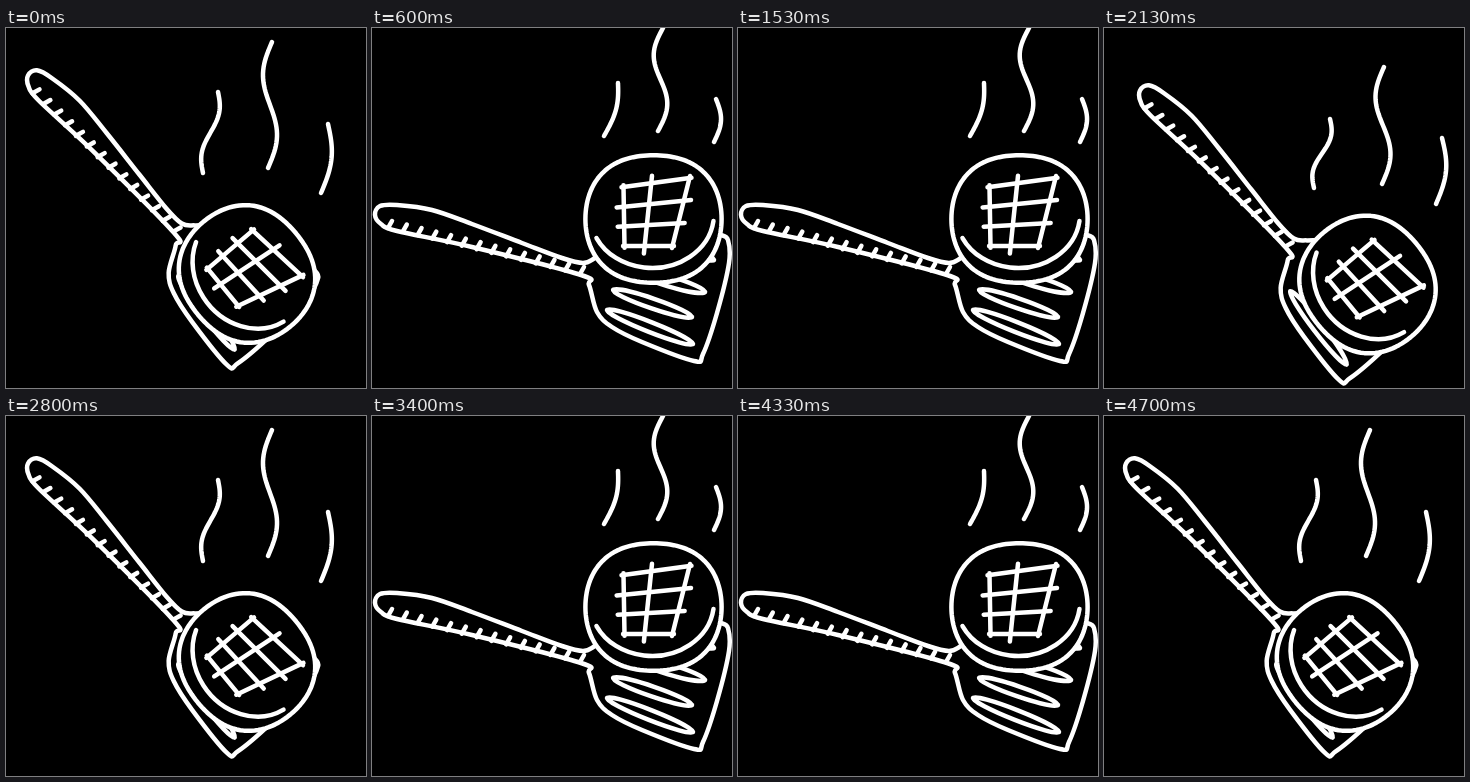
Write an HTML page with a canvas that moves like this. It is 360 px wide and 360 px high and loops after 5000 ms.

```html
<!DOCTYPE html>
<html lang="en">
<head>
<meta charset="utf-8">
<title>Flipping a patty</title>
<style>
html, body { margin: 0; width: 100%; height: 100%; overflow: hidden; background: #000; }
canvas { display: block; width: 360px; height: 360px; }
</style>
</head>
<body>
<canvas id="stage" width="360" height="360"></canvas>
<script>
const ctx = document.getElementById('stage').getContext('2d');
const { PI, sin, cos, hypot, atan2 } = Math;
const degrees = PI / 180;

const mix = (a, b, t) => a + (b - a) * t;
const between = (p, q, t) => [mix(p[0], q[0], t), mix(p[1], q[1], t)];

function polyline(points) {
  ctx.beginPath();
  points.forEach(p => ctx.lineTo(...p));
  ctx.stroke();
}

// Smooth curve through key points.
function curve(points) {
  const at = i => points[Math.max(0, Math.min(points.length - 1, i))];
  ctx.beginPath();
  ctx.moveTo(...points[0]);
  for (let i = 0; i < points.length - 1; i++) {
    const [a, b, c, d] = [at(i - 1), at(i), at(i + 1), at(i + 2)];
    ctx.bezierCurveTo(b[0] + (c[0] - a[0]) / 6, b[1] + (c[1] - a[1]) / 6,
      c[0] - (d[0] - b[0]) / 6, c[1] - (d[1] - b[1]) / 6, ...c);
  }
  ctx.stroke();
}

function placed({ x, y, turn }, paint) {
  ctx.save();
  ctx.translate(x, y);
  ctx.rotate(turn * degrees);
  paint();
  ctx.restore();
}

// Spatula, measured from the end of its handle.
const outline = [
  [236, 32], [220, 43], [208, 48], [187, 43], [147, 28], [97, 9], [57, -5], [22, -10], [5, -9],
  [0, 0], [6, 9], [22, 16], [97, 32], [206, 60], [214, 70], [222, 97], [237, 112],
  [267, 127], [319, 146], [328, 139], [342, 98], [354, 48], [353, 25], [346, 20]
];
const slots = [
  [[232, 95], [318, 129]], [[238, 75], [317, 102]],
  [[259, 56], [330, 77]], [[267, 13], [339, 45]]
];

function spatula() {
  curve(outline);
  for (let i = 0; i < 14; i++) {
    const [x, y] = between([13, 13], [205, 59], i / 13);
    polyline([[x, y], [x + 4, y - 7]]);
  }
  for (const [p, q] of slots) {
    const [dx, dy] = [q[0] - p[0], q[1] - p[1]];
    ctx.beginPath();
    ctx.ellipse(...between(p, q, .5), hypot(dx, dy) / 2, 5, atan2(dy, dx), 0, 2 * PI);
    ctx.stroke();
  }
}

// Patty, measured from its centre; its fill hides the spatula.
const [topLeft, topRight, bottomRight, bottomLeft] = [[-30, -32], [36, -41], [19, 27], [-29, 27]];

function grillLine(p, q, inner) {
  const reach = inner ? .12 : .03;
  polyline([between(p, q, -reach), between(p, q, 1 + reach)]);
}

function patty() {
  ctx.beginPath();
  for (let a = 0; a < 2 * PI; a += PI / 60) {
    const r = 67.2 + 2.2 * cos(2 * a) - 1.3 * cos(4 * a);
    ctx.lineTo(r * cos(a), r * sin(a));
  }
  ctx.closePath();
  ctx.fill();
  ctx.stroke();

  ctx.beginPath();
  ctx.ellipse(-1.5, -5, 62, 54, 0, .13, 2.68);
  ctx.stroke();

  for (const v of [0, 1 / 3, 2 / 3, 1])
    grillLine(between(topLeft, bottomLeft, v), between(topRight, bottomRight, v), v % 1);
  for (const u of [0, .42, 1])
    grillLine(between(topLeft, topRight, u), between(bottomLeft, bottomRight, u), u % 1);
}

function steam({ from, to, sway, waves }) {
  polyline(Array.from({ length: 41 }, (_, i) => {
    const [x, y] = between(from, to, i / 40);
    return [x + sway * sin(2 * PI * waves * i / 40), y];
  }));
}

const low = {
  spatula: { x: 22, y: 47.5, turn: 30.9 },
  patty: { x: 241, y: 246, turn: 50.6 },
  steam: [
    { from: [212, 64], to: [197, 145], sway: 5, waves: 1 },
    { from: [266, 14], to: [262, 140], sway: -8, waves: 1 },
    { from: [322, 96], to: [315, 165], sway: 7, waves: .5 }
  ]
};
const mid = {
  spatula: { x: 36, y: 62.5, turn: 30.9 },
  patty: { x: 263.5, y: 256.5, turn: 50.6 },
  steam: [
    { from: [226, 91], to: [210, 160], sway: 5, waves: 1 },
    { from: [280, 39], to: [278, 156], sway: -8, waves: 1 },
    { from: [338, 110], to: [332, 176], sway: 7, waves: .5 }
  ]
};
const high = {
  spatula: { x: 3, y: 187, turn: 0 },
  patty: { x: 281.5, y: 191, turn: 0 },
  steam: [
    { from: [246, 55], to: [232, 108], sway: 5, waves: .5 },
    { from: [291, 0], to: [286, 103], sway: -8, waves: 1 },
    { from: [344, 71], to: [342, 114], sway: 6, waves: .5 }
  ]
};

function draw(pose) {
  ctx.fillStyle = '#000';
  ctx.fillRect(0, 0, 360, 360);
  ctx.strokeStyle = '#fff';
  ctx.lineCap = ctx.lineJoin = 'round';
  ctx.lineWidth = 4.5;
  placed(pose.spatula, spatula);
  placed(pose.patty, patty);
  pose.steam.forEach(steam);
}

// The poses repeat in order; each entry is the time the next one begins.
const cycle = [low, mid, high];
const starts = [0, 300, 600, 930, 1230, 1530, 1830, 2130, 2430, 2800, 3100, 3400, 3730, 4030, 4330, 4700];
const begin = performance.now();

function frame() {
  const time = Math.max(0, performance.now() - begin) % 5000;
  const step = starts.filter(start => start <= time).length - 1;
  draw(cycle[step % cycle.length]);
  requestAnimationFrame(frame);
}
frame();
</script>
</body>
</html>
```
